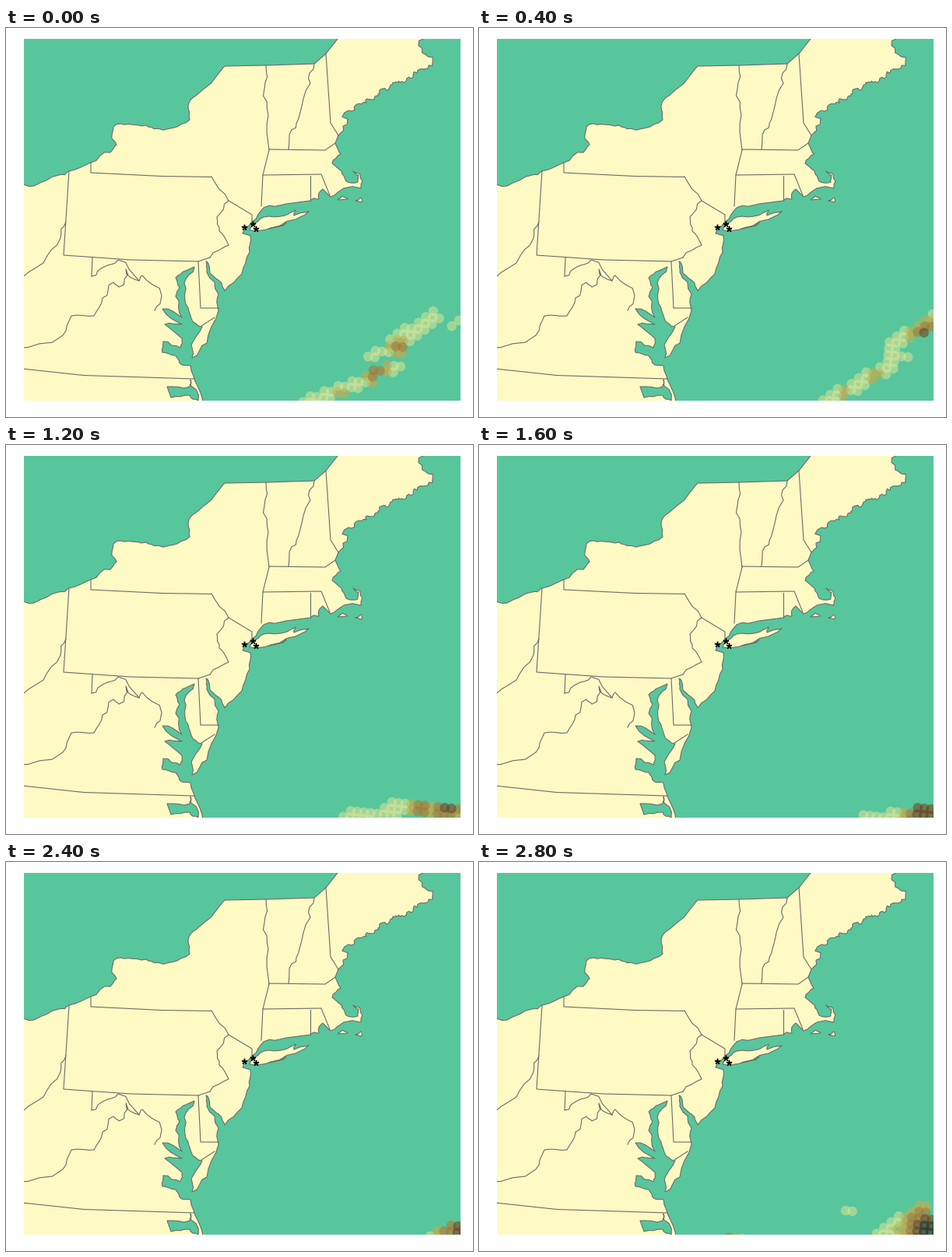
A matplotlib script for the animation above (3.2 s loop, 600x500 px).

```python
import numpy as np
import matplotlib.pyplot as plt
from matplotlib.animation import FuncAnimation
from matplotlib.patches import Polygon, Rectangle

W, H, DPI = 600, 500, 100
PX = 72 / DPI
SEA, LAND, EDGE = "#57c69c", "#fff9c4", "#6b6b6b"
# rain levels, light to heavy
RAIN = np.array(["#e8e696", "#d9a840", "#bd6a20", "#7a2c0c", "#2e1810"])

rng = np.random.default_rng(4)

lakes = [(12, 202), (36, 203), (68, 189), (81, 184), (109, 173), (134, 160), (142, 150), (136, 138),
         (138, 127), (157, 123.5), (180, 125), (190, 129.5), (214, 128.5), (236, 118), (234, 100),
         (244, 87), (279, 51)]
north = [(281, 49), (334, 48), (396, 46), (411, 33), (426, 14), (430, 4), (533, 4)]
maine = [(536, 14), (548, 44), (528, 58), (512, 70), (497, 70), (484, 78), (474, 88), (463, 96),
         (440, 106), (427, 138)]
cape = [(423, 148), (430, 162), (419, 174), (431, 184), (437, 197), (452, 198), (453, 189), (446, 184),
        (455, 188), (456, 206), (434, 206), (417, 217), (407, 207), (402, 220), (391, 222)]
sound = [(360, 226), (331, 231), (316, 249), (304, 264), (314, 267), (313, 288), (303, 316),
         (281, 338), (277, 328), (262, 315), (259, 301)]
delmarva = [(257, 300), (258, 314), (273, 342), (273, 363), (258, 405), (239, 424), (241, 402),
            (252, 384), (238, 373), (231, 355), (229, 328), (242, 307)]
bay = [(231, 312), (218, 321), (223, 333), (218, 345), (226, 372), (201, 361), (226, 381), (204, 381),
       (226, 399), (224, 411), (202, 403), (201, 417), (218, 421), (226, 433), (237, 434), (246, 460),
       (254, 490), (12, 490)]
long_island = [(313, 260), (340, 257), (382, 241), (389, 236), (370, 241), (372, 234), (358, 241),
               (331, 243), (316, 253)]
islands = [[(426, 221), (432, 216), (439, 220)], [(449, 222), (456, 218), (457, 224)],
           [(338, 258), (360, 250), (351, 255)]]
inlet = [(207, 461), (236, 461), (237, 452), (247, 479), (236, 472), (212, 475)]

straight = [
    [(81, 184), (74, 292), (160, 298), (247, 300), (250, 360), (273, 360)],
    [(109, 173), (109, 186), (200, 190.5), (264, 191.5)],
    [(247, 300), (262, 295)],
    [(111, 295), (110, 319)],
    [(286, 222), (316, 240), (316, 249)],
    [(338, 157), (330, 189), (328, 229)],
    [(338, 156), (410, 157), (423, 148)],
    [(330, 189), (405, 188), (416, 215)],
    [(391, 190), (391, 222)],
    [(411, 33), (417, 122), (427, 138)],
    [(251, 383), (268, 372)],
    [(12, 437), (100, 446.5), (242, 451)],
]
rivers = [
    [(264, 191), (286, 222), (271, 243), (274, 261), (286, 279), (262, 295)],
    [(334, 48), (332, 78), (337, 112), (338, 157)],
    [(396, 46), (391, 71), (377, 112), (367, 131), (363, 156)],
    [(110, 319), (126, 307), (144, 298), (171, 325), (175, 318), (200, 344), (191, 363)],
    [(171, 325), (154, 310), (145, 333), (138, 327), (124, 347), (113, 370), (84, 370), (73, 395),
     (12, 411)],
    [(77, 249), (70, 270), (48, 302), (12, 330)],
]

# rain bands per step: x0, y0, x1, y1, half width
BANDS = [
    [(572, 384, 588, 374, 4), (548, 372, 500, 408, 11), (468, 419, 508, 416, 5),
     (506, 435, 465, 446, 6), (465, 452, 388, 480, 8)],
    [(585, 372, 528, 412, 9), (550, 424, 526, 425, 5), (524, 436, 448, 480, 9)],
    [(588, 408, 503, 476, 12)],
    [(435, 478, 500, 471, 7), (500, 467, 588, 469, 9)],
    [(495, 482, 588, 470, 8)],
    [(545, 481, 588, 468, 7)],
    [(548, 482, 588, 468, 9)],
    [(472, 446, 480, 446, 5), (520, 480, 568, 450, 11), (550, 476, 588, 468, 12),
     (318, 480, 346, 482, 4)],
]
# heavy cores per step: x, y, radius, level
CORES = [
    [(505, 409, 7, 2), (476, 442, 9, 2), (434, 479, 7, 2)],
    [(576, 394, 8, 3), (508, 445, 9, 1), (470, 471, 9, 1)],
    [(560, 432, 9, 3), (583, 412, 8, 1)],
    [(567, 463, 9, 3), (536, 467, 9, 2)],
    [(572, 471, 11, 3)],
    [(574, 473, 10, 2)],
    [(584, 478, 11, 3)],
    [(577, 474, 10, 4), (319, 480, 8, 2)],
]


def rough(pts, amount=0.1, depth=2):
    """Split each segment and push its middle sideways, again and again."""
    pts = np.array(pts, float)
    for _ in range(depth):
        d = np.diff(pts, axis=0)
        size = np.hypot(*d.T)
        push = np.clip(rng.normal(0, amount, len(d)), -2 * amount, 2 * amount)
        push *= np.minimum(1, 14 / size)
        mid = pts[:-1] + d / 2 + push[:, None] * np.c_[-d[:, 1], d[:, 0]]
        pts = np.vstack([np.stack([pts[:-1], mid], 1).reshape(-1, 2), pts[-1:]])
    return list(pts)


fig = plt.figure(figsize=(W / DPI, H / DPI), dpi=DPI, facecolor="white")
ax = fig.add_axes([0, 0, 1, 1])
ax.set(xlim=(0, W), ylim=(H, 0))
ax.axis("off")
frame = Rectangle((23, 14), 561, 465, fc=SEA, ec="none", zorder=0)
ax.add_patch(frame)


def area(pts, color=LAND, z=1):
    shape = Polygon(pts, closed=True, fc=color, ec=EDGE, lw=1.1 * PX, joinstyle="round", zorder=z)
    ax.add_patch(shape)
    shape.set_clip_path(frame)


def line(pts):
    xs, ys = zip(*pts)
    path, = ax.plot(xs, ys, color=EDGE, lw=1.1 * PX, solid_joinstyle="round", zorder=3)
    path.set_clip_path(frame)


area(rough(lakes) + north + rough(maine, 0.28, 3) + rough(cape) + rough(sound, 0.07)
     + rough(delmarva) + rough(bay))
area(rough(inlet, 0.15), SEA, 2)
area(rough(long_island, 0.07))
for isle in islands:
    area(rough(isle))
for border in straight:
    line(border)
for river in rivers:
    line(rough(river, 0.14))

ax.plot([306, 317, 320.5], [255.5, 251.5, 257.5], ls="none", marker=(5, 2, 0),
        ms=7.4 * PX, mew=1.5 * PX, color="black", zorder=6)

rain = ax.scatter([], [], s=(12.6 * PX) ** 2, alpha=0.5, linewidths=0, zorder=5)
rain.set_clip_path(frame)

# slightly tilted radar grid
col, row = np.meshgrid(np.arange(-32, 8), np.arange(-3, 20))
GX = (549 + 8.5 * col - 0.9 * row).ravel()
GY = (364 + 0.9 * col + 8.3 * row).ravel()


def near(x0, y0, x1, y1, half):
    dx, dy = x1 - x0, y1 - y0
    t = np.clip(((GX - x0) * dx + (GY - y0) * dy) / (dx * dx + dy * dy), 0, 1)
    return np.hypot(GX - x0 - t * dx, GY - y0 - t * dy) <= half


def cells(i):
    wet = np.any([near(*band) for band in BANDS[i]], axis=0)
    level = np.zeros(GX.size, int)
    for x, y, r, top in CORES[i]:
        level = np.maximum(level, top - (np.hypot(GX - x, GY - y) // r).astype(int))
    order = np.argsort(level[wet], kind="stable")
    return np.c_[GX, GY][wet][order], RAIN[level[wet][order]]


def draw(i):
    spots, colors = cells(i)
    rain.set_offsets(spots)
    rain.set_facecolor(list(colors))
    return rain,


anim = FuncAnimation(fig, draw, frames=len(BANDS), interval=400, init_func=lambda: draw(0),
                     repeat=True, repeat_delay=0, blit=False)
plt.show()
```
